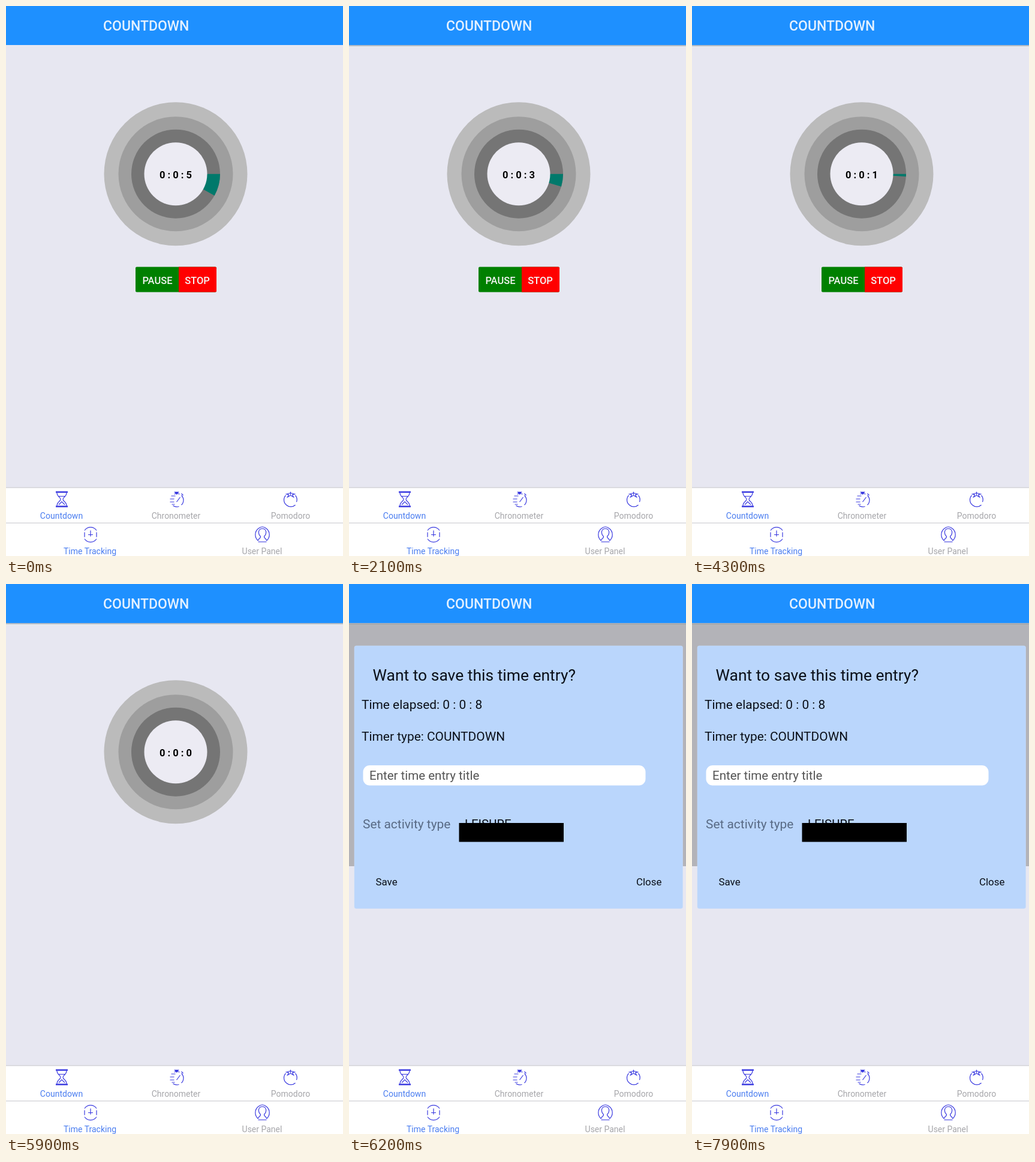
Write an HTML page that moves like this. It is 562x916 px and loops after 8 s.

```html
<!DOCTYPE html>
<html lang="en">
<head>
<meta charset="utf-8">
<title>Countdown</title>
<style>
  html, body { margin: 0; width: 100%; height: 100%; overflow: hidden; background: #e7e7f1; }
  svg { display: block; width: 562px; height: 916px; font-family: Roboto, sans-serif; }
  .mid { text-anchor: middle; }
  .icon { fill: none; stroke: #3a3ae0; stroke-width: 1.2; }
  .nav { font-size: 14px; fill: #a6a6aa; text-anchor: middle; }
  .nav .on { fill: #4a7df0; }
  .button { font-size: 16.5px; font-weight: 500; fill: #f4f4f4; text-anchor: middle; }
  #dialog { font-size: 20.9px; fill: #0a0f18; }
</style>
</head>
<body>
<svg viewBox="0 0 562 916">
  <rect width="562" height="916" fill="#e7e7f1"/>
  <g id="shade">
    <rect y="65" width="562" height="2" fill="#b4bac4"/>
    <rect y="67" width="562" height="2" fill="#e6e8ec"/>
  </g>
  <rect width="562" height="65" fill="#1e90ff"/>
  <text x="162" y="41" font-size="23" font-weight="500" fill="#e4f1ff">COUNTDOWN</text>

  <g transform="translate(283 279.7)">
    <circle r="119.5" fill="#bbb"/>
    <circle r="95.5" fill="#9e9e9e"/>
    <circle r="74" fill="#757575"/>
    <path id="wedge" fill="#00796b"/>
    <circle r="52.5" fill="#ecebf3"/>
    <text id="clock" class="mid" y="7.3" font-size="16.5" font-weight="700"></text>
  </g>

  <g id="buttons" class="button">
    <rect x="216" y="434.5" width="135" height="42" rx="2" fill="#008000"/>
    <path d="M288 434.5h61a2 2 0 0 1 2 2v38a2 2 0 0 1-2 2h-61z" fill="#f00"/>
    <text x="252.5" y="462.5">PAUSE</text>
    <text x="319" y="462.5">STOP</text>
  </g>

  <rect y="803" width="562" height="113" fill="#fff"/>
  <path d="M0 802h562M0 861h562" stroke="#d8d8dc" stroke-width="1.6"/>
  <g class="icon">
    <g transform="translate(93 821.5)">
      <path d="M-10-12H10M-10 12H10" stroke-width="2.4"/>
      <path d="M-8-11C-8-4-2-4-2 0S-8 4-8 11M8-11C8-4 2-4 2 0S8 4 8 11M-5-5H5M-5 9L0 4L5 9"/>
    </g>
    <g transform="translate(284.5 822)">
      <path d="M-4-9A11 11 0 0 1 5-9M8-7A11 11 0 0 1 8 9M4 11.5A11 11 0 0 1-6 10M-9-6h7M-11-1h7M-11 4h7M-8 8h5M0 4L6-4M8-10l3 3"/>
      <path d="M-3-12.5H3L0-9z" fill="#3a3ae0"/>
    </g>
    <g transform="translate(474.5 822)">
      <path d="M-8-7A11 11 0 0 0-7 9A11 11 0 0 0 8 9M8-7A11 11 0 0 1 10 4"/>
      <path d="M0-13V-8M-7-9L0-11L7-9L3-8L5-4L0-7L-5-4L-3-8z"/>
    </g>
    <g transform="translate(141 880.5)">
      <path d="M-10-7A12 12 0 0 1 10-7M10 7A12 12 0 0 1-10 7M-10-4v8M10-4v8M0-7V3M-4 0H4"/>
    </g>
    <g transform="translate(427.5 880.5)">
      <path d="M-7 10A13 13 0 0 1-7-10M7-10A13 13 0 0 1 7 10M-7-10Q0-16 7-10M-7 12H7"/>
      <path d="M-7 10C-6 5-3 7-3 3C-8-2-7-10 0-10S8-2 3 3C3 7 6 5 7 10"/>
    </g>
  </g>
  <g class="nav">
    <text class="on" x="92.5" y="854">Countdown</text>
    <text x="283.5" y="854">Chronometer</text>
    <text x="474.5" y="854">Pomodoro</text>
    <text class="on" x="140" y="913">Time Tracking</text>
    <text x="427" y="913">User Panel</text>
  </g>

  <g id="modal">
    <rect id="dim" y="66" width="562" fill="#808080" fill-opacity=".5"/>
    <g id="dialog">
      <rect id="edge" x="3" y="101" width="548" height="439" fill="#dcdde2"/>
      <rect x="9" y="103" width="547.5" height="437.5" rx="3" fill="#bad6fc" stroke="#c6dcfa" stroke-opacity=".6"/>
      <text x="39.5" y="161" font-size="26.45">Want to save this time entry?</text>
      <text x="21" y="208">Time elapsed: 0 : 0 : 8</text>
      <text x="21" y="261">Timer type: COUNTDOWN</text>
      <rect x="23.5" y="302" width="471" height="33.5" rx="11" fill="#fff"/>
      <text x="34" y="326" font-size="20.5" fill="#555">Enter time entry title</text>
      <text x="23" y="407" fill="#586a84">Set activity type</text>
      <text x="193" y="407" font-size="20.4">LEISURE</text>
      <rect x="183.5" y="398" width="174.5" height="31.5" fill="#000"/>
      <text x="44.5" y="502" font-size="16.9">Save</text>
      <text x="479" y="502" font-size="16.9">Close</text>
    </g>
  </g>
</svg>
<script>
  const LOOP = 8000, STEP = 100, ZERO = 4850, OPEN = 6000, SLIDE = 200;
  const el = id => document.getElementById(id);
  const show = (id, on) => el(id).setAttribute('display', on ? 'inline' : 'none');

  function draw(t) {
    const left = Math.max(0, (ZERO - t) / 1000);
    const angle = left * Math.PI / 30; // a full turn is one minute
    el('clock').textContent = `0 : 0 : ${Math.ceil(left)}`;
    el('wedge').setAttribute('d',
      `M0 0H74A74 74 0 0 1 ${74 * Math.cos(angle)} ${74 * Math.sin(angle)}Z`);
    show('buttons', left > 0);
    show('shade', t >= STEP);

    // the dialog slides up and eases out
    const p = Math.min(1, Math.max(0, (t - OPEN) / SLIDE));
    const rest = (1 - p) ** 3;
    show('modal', t >= OPEN);
    show('edge', p < 1);
    el('dim').setAttribute('height', 404 - 38 * rest);
    el('dialog').setAttribute('transform', `translate(${6 * rest} ${776 * rest})`);
  }

  const start = performance.now();
  function tick() {
    const t = (performance.now() - start) % LOOP;
    draw(Math.floor(t / STEP) * STEP);
    requestAnimationFrame(tick);
  }
  tick();
</script>
</body>
</html>
```
